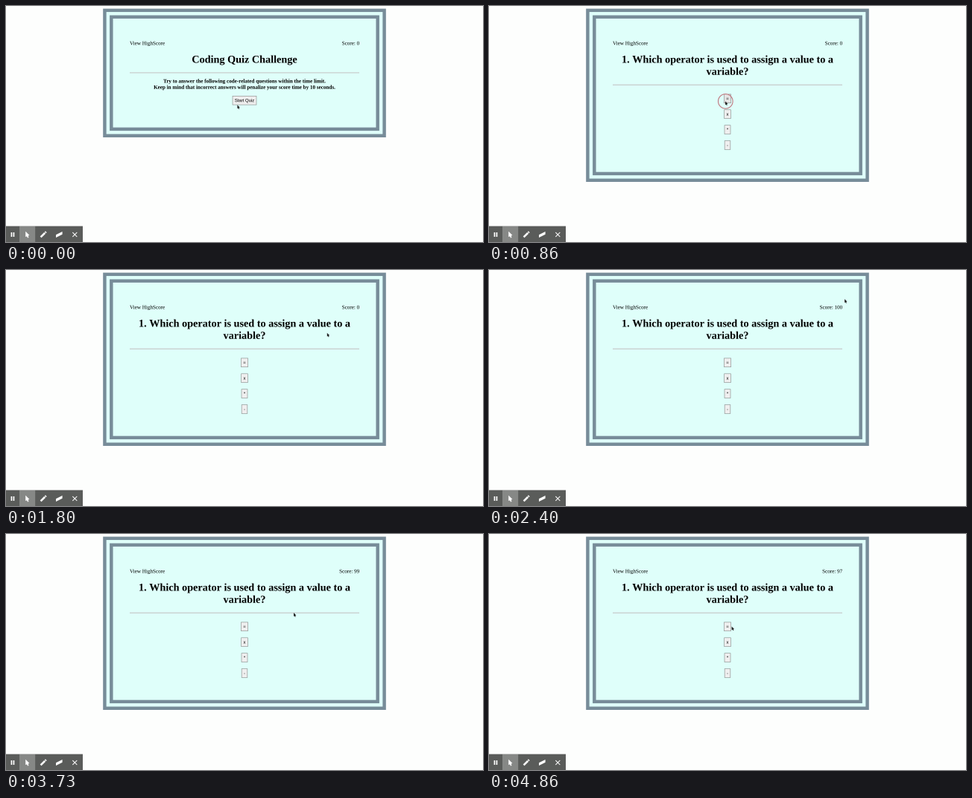
Write an HTML page with a canvas that moves like this. It is 640 by 318 pixels and loops after 4930 ms.

```html
<!DOCTYPE html>
<html lang="en">
<head>
<meta charset="utf-8">
<title>Coding Quiz Challenge</title>
<style>
  html, body { margin: 0; width: 100%; height: 100%; overflow: hidden; background: #fdfefd; }
  canvas { display: block; width: 640px; height: 318px; }
</style>
</head>
<body>
<canvas id="stage"></canvas>
<script>
const W = 640, H = 318, LOOP = 4930, STEP = 200 / 3, LAST = 73;
const CLICK = 12, QUESTION = 13;
const SCALE = 4 / 9;
const PAGE = '#fdfefd', SLATE = '#778c99', CYAN = '#dffffa', WHITE = '#fff';

const serif = (px, weight = '') => `${weight} ${px * SCALE}px "Liberation Serif", Times, serif`;
const BODY = serif(16), BOLD = serif(16, 'bold'), TITLE = serif(32, 'bold');
const LABEL = `${13.333 * SCALE}px "Liberation Sans", Arial, sans-serif`;

// The scene is drawn large and reduced, which keeps small type soft and unhinted.
const DETAIL = 4;
const ratio = window.devicePixelRatio || 1;
const stage = document.getElementById('stage');
stage.width = W * ratio;
stage.height = H * ratio;
const view = stage.getContext('2d');
view.imageSmoothingQuality = 'high';
const scene = document.createElement('canvas');
scene.width = W * ratio * DETAIL;
scene.height = H * ratio * DETAIL;
const ctx = scene.getContext('2d');
ctx.scale(ratio * DETAIL, ratio * DETAIL);

// Turning points of the pointer: step, x, y
const path = [
  [0, 310.4, 133.4], [7, 317, 128.4], [20, 317, 128.4], [27, 430.8, 84.8],
  [33, 494, 42], [37, 474, 39], [44, 481, 61], [45, 487.6, 56.6],
  [49, 453, 45], [56, 386, 106.2], [60, 364, 107], [69, 325.6, 124.6], [LAST, 325.6, 124.6]
];

// Monotone cubic through the turning points, so pauses stay still
function along(k, axis) {
  const slope = i => (path[i + 1][axis] - path[i][axis]) / (path[i + 1][0] - path[i][0]);
  const tangent = i => {
    if (i === 0 || i === path.length - 1) return 0;
    const a = slope(i - 1), b = slope(i);
    return a * b > 0 ? 2 * a * b / (a + b) : 0;
  };
  const i = Math.max(0, path.findIndex(p => p[0] >= k) - 1);
  const span = path[i + 1][0] - path[i][0];
  const u = (k - path[i][0]) / span, v = 1 - u;
  return path[i][axis] * v * v * (1 + 2 * u) + path[i + 1][axis] * u * u * (3 - 2 * u)
    + span * u * v * (tangent(i) * v - tangent(i + 1) * u);
}

function scoreAt(k) {
  return k < QUESTION + 15 ? 0 : 101 - Math.floor((k - QUESTION) / 15);
}

function rect(x, y, w, h, color) {
  ctx.fillStyle = color;
  ctx.fillRect(x, y, w, h);
}

function text(str, x, y, font, align = 'center') {
  ctx.font = font;
  ctx.textAlign = align;
  ctx.fillStyle = '#000';
  ctx.fillText(str, x, y);
}

function line(x0, y0, x1, y1, color, width) {
  ctx.beginPath();
  ctx.moveTo(x0, y0);
  ctx.lineTo(x1, y1);
  ctx.strokeStyle = color;
  ctx.lineWidth = width;
  ctx.stroke();
}

function ring(r, color, width) {
  ctx.beginPath();
  ctx.arc(317.3, 128.4, r, 0, Math.PI * 2);
  ctx.strokeStyle = color;
  ctx.lineWidth = width;
  ctx.stroke();
}

function arrow(x, y, size, color) {
  ctx.save();
  ctx.translate(x, y);
  ctx.scale(size, size);
  ctx.beginPath();
  ctx.moveTo(0, 0);
  ctx.lineTo(0, 1);
  ctx.lineTo(0.7, 0.7);
  ctx.fillStyle = color;
  ctx.fill();
  line(0.25, 0.6, 0.48, 1.15, color, 0.22);
  ctx.restore();
}

function card(bottom) {
  const band = 4.45;
  for (let i = 0; i < 4; i++) {
    const d = i * band;
    rect(130.2 + d, 3.6 + d, 379.6 - 2 * d, bottom - 3.6 - 2 * d, i % 2 ? CYAN : SLATE);
  }
}

function button(label, top, mouse, pressed) {
  ctx.font = LABEL;
  const w = ctx.measureText(label).width + 6.3, h = 12.4, x = 320 - w / 2;
  const over = Math.abs(mouse.x - 320) < w / 2 && mouse.y > top && mouse.y < top + h;
  rect(x, top, w, h, pressed ? '#b4b8b7' : '#858786');
  rect(x + 0.6, top + 0.6, w - 1.2, h - 1.2, pressed ? '#f4f5f4' : over ? '#e5e5e5' : '#efefef');
  text(label, 320, top + 8.2, LABEL);
}

function rule(y) {
  rect(166, y, 308, 0.9, '#bfb9bb');
}

function toolbar() {
  const top = 296.6, mid = 308;
  rect(0, top, 103, H - top, '#5a5c5a');
  rect(18, top, 21.2, H - top, '#868886');
  for (const x of [6.6, 9.6]) rect(x, mid - 3, 1.7, 6, WHITE);
  arrow(26.2, mid - 4.3, 7.4, WHITE);
  line(46.6, mid + 3.4, 52.2, mid - 2.2, WHITE, 2.6);
  line(52.7, mid - 2.7, 53.8, mid - 3.8, WHITE, 2.6);

  ctx.save();
  ctx.transform(1, -0.5, 0, 1, 71.3, mid);
  rect(-4.3, -1.9, 8.6, 3.8, WHITE);
  ctx.restore();

  for (const s of [-3, 3]) line(92.3 - s, mid - 3, 92.3 + s, mid + 3, WHITE, 1);
}

function intro(mouse, pressed) {
  text('Coding Quiz Challenge', 320, 76.4, TITLE);
  rule(89.5);
  text('Try to answer the following code-related questions within the time limit.', 320, 103.5, BOLD);
  text('Keep in mind that incorrect answers will penalize your score time by 10 seconds.', 320, 111.7, BOLD);
  button('Start Quiz', 121, mouse, pressed);
}

function question(mouse) {
  text('1. Which operator is used to assign a value to a', 320, 76.4, TITLE);
  text('variable?', 320, 92.8, TITLE);
  rule(105.8);
  ['=', 'x', '*', '-'].forEach((label, i) => button(label, 118.6 + i * 20.9, mouse));
}

function draw(k) {
  const mouse = { x: along(k, 1), y: along(k, 2) }, asking = k >= QUESTION;
  rect(0, 0, W, H, PAGE);
  card(asking ? 237 : 177);
  text('View HighScore', 166, 52.4, BODY, 'left');
  text('Score: ' + scoreAt(k), 474.2, 52.4, BODY, 'right');
  if (asking) question(mouse);
  else intro(mouse, k === CLICK);
  if (k === CLICK) ring(14, '#e87f80', 1.8);
  if (k === QUESTION) ring(9.8, '#c0757d', 1.1);
  toolbar();
  arrow(mouse.x, mouse.y, 4.7, '#222');
  view.drawImage(scene, 0, 0, stage.width, stage.height);
}

const start = performance.now();
let shown = -1;
function tick() {
  const t = (performance.now() - start) % LOOP;
  // Source ticks fall on whole hundredths, hence the small lead
  const k = Math.min(LAST, Math.floor((t + 9.9) / STEP));
  if (k !== shown) draw(shown = k);
  requestAnimationFrame(tick);
}
tick();
</script>
</body>
</html>
```
